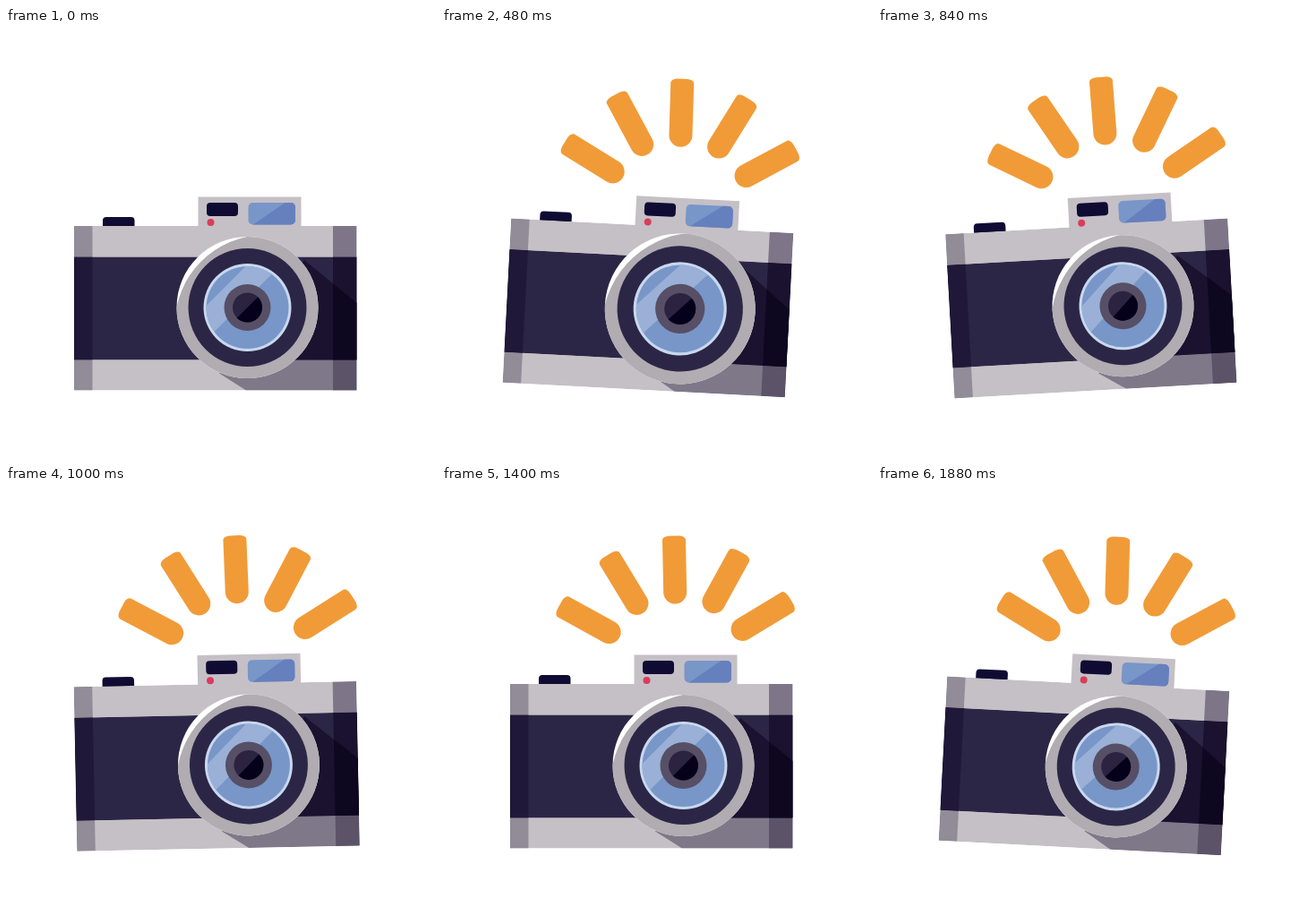
Write an HTML page with a canvas that moves like this. It is 480 px wide and 480 px high and loops after 1.92 s.

```html
<!DOCTYPE html>
<html lang="en">
<head>
<meta charset="utf-8">
<title>Camera flash</title>
<style>
html, body { margin: 0; width: 100%; height: 100%; overflow: hidden; background: #fff; }
canvas { display: block; width: 480px; height: 480px; }
</style>
</head>
<body>
<canvas id="stage" width="480" height="480"></canvas>
<script>
const ctx = document.getElementById('stage').getContext('2d');
const LOOP = 1920, STEP = 40, WOBBLE = 700, TILT = 4;
const INK = '#0f0b32', NAVY = '#2c2646', SILVER = '#c5c0c6', BLUE = '#7896c8';
const rad = d => d * Math.PI / 180;
const clamp = v => Math.max(0, Math.min(1, v));

// Triangle wave, 0 at the start, peak 1
function tri(p) {
  p -= Math.floor(p);
  return p < .25 ? 4 * p : p < .75 ? 2 - 4 * p : 4 * p - 4;
}

function rect(x, y, w, h, color) {
  ctx.fillStyle = color;
  ctx.fillRect(x, y, w, h);
}

function round(x, y, w, h, r, color) {
  ctx.beginPath();
  ctx.roundRect(x, y, w, h, r);
  ctx.fillStyle = color;
  ctx.fill();
}

function disc(x, y, r, color) {
  ctx.beginPath();
  ctx.arc(x, y, r, 0, Math.PI * 2);
  ctx.fillStyle = color;
  ctx.fill();
}

function poly(points, color) {
  ctx.beginPath();
  points.forEach(p => ctx.lineTo(p[0], p[1]));
  ctx.closePath();
  ctx.fillStyle = color;
  ctx.fill();
}

function clipped(shape, draw) {
  ctx.save();
  ctx.beginPath();
  shape();
  ctx.clip();
  draw();
  ctx.restore();
}

function burst(t) {
  const p = clamp((t - 140) / 290);
  if (!p) return;
  const outer = 149 - 108.3 * (1 - p);
  for (let i = -2; i <= 2; i++) {
    const inner = 73 - (22 + 6 * Math.abs(i)) * (1 - p);
    const len = outer - inner;
    if (len <= 0) continue;
    ctx.save();
    ctx.translate(262, 204.5);
    ctx.rotate(rad(i * 30 - 1.2));
    const tip = { x: 8, y: 4.5 };
    round(-13, -outer, 26, len, [tip, tip, 13, 13], '#f19b38');
    ctx.restore();
  }
}

const shadow = [[238, 385.5], [268, 404.5], [391.5, 404.5], [391.5, 307], [333, 259]];

function band(y, h, [base, left, right, dark, deep]) {
  clipped(() => ctx.rect(76, y, 315.5, h), () => {
    rect(76, y, 315.5, h, base);
    rect(76, y, 20.5, h, left);
    rect(365, y, 26.5, h, right);
    poly(shadow, dark);
    clipped(() => ctx.rect(365, y, 26.5, h), () => poly(shadow, deep));
  });
}

function body() {
  round(108, 211, 35.5, 14, 4, INK);
  rect(214.5, 188.5, 115, 36, SILVER);
  const metal = [SILVER, '#918c98', '#7e7688', '#7f7889', '#5d5368'];
  const grip = [NAVY, '#1f1838', '#1a122f', '#1a122f', '#0d081f'];
  band(221, 183.5, metal);
  band(255.5, 115, grip);
  round(224, 195, 35, 15, 4, INK);
  disc(228.5, 217, 4, '#d93d5c');
  clipped(() => ctx.roundRect(270.5, 195, 52.5, 24.5, 5), () => {
    rect(270, 194, 54, 27, BLUE);
    poly([[275, 220], [313, 194], [325, 194], [325, 221]], '#6580bd');
  });
}

function lens(scale) {
  ctx.save();
  ctx.translate(269.5, 312);
  ctx.scale(scale, scale);
  disc(0, 0, 79, '#fff');
  clipped(() => ctx.arc(0, 0, 79, 0, Math.PI * 2), () => disc(19.4, 19.4, 100.4, '#b0acb1'));
  disc(0, 0, 66, NAVY);
  disc(0, 0, 49, '#c8d8ee');
  disc(0, 0, 46, BLUE);
  clipped(() => ctx.arc(0, 0, 46, 0, Math.PI * 2), () =>
    poly([[-98, 50], [52, -100], [90, -100], [-60, 50]], '#9ab0d6'));
  disc(0, 0, 26, '#574f66');
  disc(0, 0, 16.5, '#2b2340');
  clipped(() => ctx.arc(0, 0, 16.5, 0, Math.PI * 2), () =>
    poly([[-20, 20], [20, -20], [20, 20]], '#05011b'));
  ctx.restore();
}

function draw(t) {
  ctx.clearRect(0, 0, 480, 480);
  ctx.save();
  ctx.translate(240, 240);
  ctx.rotate(rad(-TILT * tri(t / WOBBLE)));
  ctx.translate(-240, -240);
  burst(t);
  body();
  lens(1 + .22 * clamp(1 - Math.abs(t - 280) / 280));
  ctx.restore();
}

const start = performance.now();
function tick() {
  const t = (performance.now() - start) % LOOP;
  draw(Math.floor(t / STEP) * STEP);
  requestAnimationFrame(tick);
}
tick();
</script>
</body>
</html>
```
